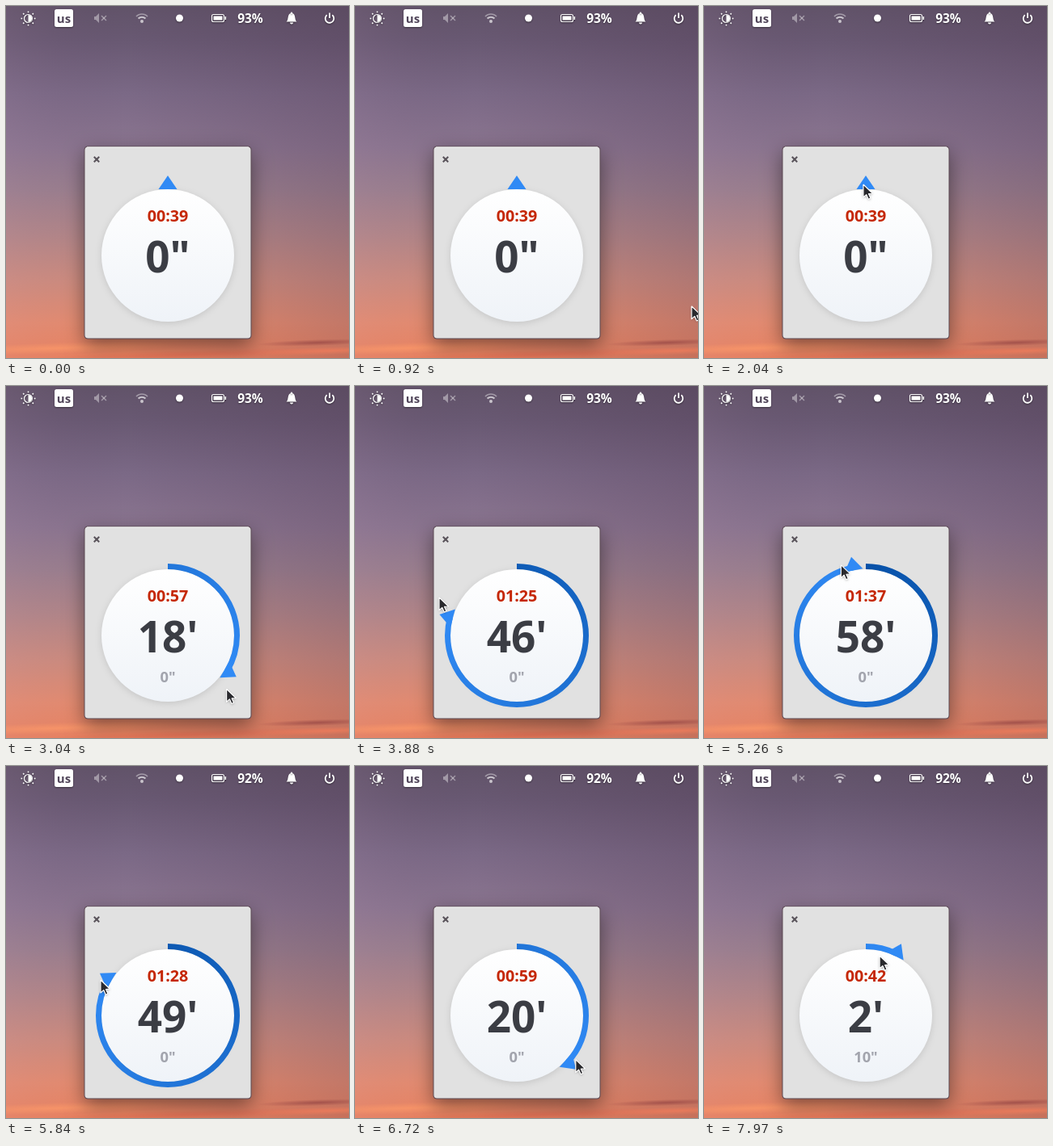
Recreate the animation shown at these times as an HTML page with a canvas. Size 424 by 436 pixels, loop 8 s.

```html
<!DOCTYPE html>
<html lang="en">
<head>
<meta charset="utf-8">
<title>Dial timer</title>
<style>
  html, body { margin: 0; width: 100%; height: 100%; overflow: hidden; }
  canvas { display: block; width: 424px; height: 436px; }
</style>
</head>
<body>
<canvas id="stage" width="424" height="436"></canvas>
<script>
const ctx = document.getElementById('stage').getContext('2d');
const W = 424, H = 436, LOOP = 8000;
const CX = 200, CY = 309, DISC = 82, RING = 7;
const BRIGHT = '#308af5', DARK = '#064fa5';
const RAD = Math.PI / 180;
const START_CLOCK = 39 * 60 + 51;

// Tracks of [time, value]
const headTrack = [[2200, 0], [2520, 18], [3340, 190], [3880, 285], [4170, 330],
  [4480, 390], [4630, 384.5], [5840, 302], [6720, 132.5], [7970, 26.3]];
const handTrack = [[2100, -2], [2520, 24], [3340, 203], [3880, 296], [4170, 342],
  [4460, 388], [4630, 376.7], [5840, 298], [6720, 127], [7970, 13]];
const reachTrack = [[2100, 88], [3880, 107], [4630, 91], [5840, 94], [6720, 91], [7970, 76]];

// Smooth interpolation that never overshoots a turning point
function sample(track, t) {
  const last = track.length - 1;
  if (t <= track[0][0]) return track[0][1];
  if (t >= track[last][0]) return track[last][1];
  const slope = i => (track[i + 1][1] - track[i][1]) / (track[i + 1][0] - track[i][0]);
  const tangent = i => {
    if (i === 0 || i === last) return 0;
    const a = slope(i - 1), b = slope(i);
    return a * b <= 0 ? 0 : 2 * a * b / (a + b);
  };
  const i = track.findIndex(key => key[0] > t) - 1;
  const [t0, v0] = track[i], [t1, v1] = track[i + 1];
  const d = t1 - t0, u = (t - t0) / d;
  return v0 + (v1 - v0) * u * u * (3 - 2 * u)
    + d * u * (1 - u) * ((1 - u) * tangent(i) - u * tangent(i + 1));
}

// The first tenth of the dial is stretched: three minutes in ten-second steps
function dialSeconds(angle) {
  const turns = angle / 360;
  if (turns <= 0.1) return Math.floor(turns * 180) * 10;
  return Math.floor((60 * turns - 3) / 57 * 60) * 60;
}

function polar(angle, radius) {
  return [CX + radius * Math.sin(angle * RAD), CY - radius * Math.cos(angle * RAD)];
}

function gradient(x0, y0, x1, y1, stops) {
  const g = ctx.createLinearGradient(x0, y0, x1, y1);
  stops.forEach(([at, color]) => g.addColorStop(at, color));
  return g;
}

function shadow(color, blur, y) {
  ctx.shadowColor = color;
  ctx.shadowBlur = blur;
  ctx.shadowOffsetY = y;
}
const noShadow = () => shadow('transparent', 0, 0);

function polygon(points, color) {
  ctx.beginPath();
  points.forEach(([x, y]) => ctx.lineTo(x, y));
  ctx.closePath();
  ctx.fillStyle = color;
  ctx.fill();
}

function line(points, width = 1.5) {
  ctx.beginPath();
  points.forEach(([x, y]) => ctx.lineTo(x, y));
  ctx.lineWidth = width;
  ctx.stroke();
}

function arc(x, y, r, from = 0, to = 360) {
  ctx.beginPath();
  ctx.arc(x, y, r, from * RAD, to * RAD);
}

function box(x, y, w, h, r, color) {
  ctx.beginPath();
  ctx.roundRect(x, y, w, h, r);
  ctx.fillStyle = color;
  ctx.fill();
}

function label(str, x, y, size, color) {
  ctx.font = `700 ${size}px "Open Sans", sans-serif`;
  ctx.textAlign = 'center';
  ctx.fillStyle = color;
  ctx.fillText(str, x, y);
}

function drawSky() {
  ctx.fillStyle = gradient(0, 0, 0, H, [[0, '#615369'], [0.1, '#695973'], [0.25, '#7b6986'],
    [0.4, '#8b7590'], [0.52, '#9b7f8f'], [0.65, '#b48789'], [0.78, '#d08d7f'],
    [0.9, '#e88d70'], [1, '#ee8460']]);
  ctx.fillRect(0, 0, W, H);
  ctx.fillStyle = gradient(0, 0, W, 0, [[0, 'rgba(170,135,165,.12)'],
    [0.35, 'rgba(75,50,75,0)'], [1, 'rgba(75,50,75,.24)']]);
  ctx.fillRect(0, 0, W, H);
  const streaks = [[60, 424, 150, 7, '255,155,105,.65'], [230, 432, 200, 6, '224,102,78,.55'],
    [385, 417, 75, 4, '146,66,66,.7'], [400, 427, 95, 5, '250,128,90,.6']];
  for (const [x, y, rx, ry, rgba] of streaks) {
    ctx.save();
    ctx.translate(x, y);
    ctx.rotate(-0.03);
    ctx.scale(rx, ry);
    const g = ctx.createRadialGradient(0, 0, 0, 0, 0, 1);
    g.addColorStop(0, `rgba(${rgba})`);
    g.addColorStop(1, `rgba(${rgba.replace(/[^,]+$/, '0')})`);
    ctx.fillStyle = g;
    ctx.fillRect(-1, -1, 2, 2);
    ctx.restore();
  }
}

function drawPanel(battery) {
  ctx.strokeStyle = ctx.fillStyle = '#fff';
  shadow('rgba(0,0,0,.45)', 2, 1);

  // Brightness
  arc(27.5, 15.5, 5);
  ctx.lineWidth = 1.2;
  ctx.stroke();
  arc(27.5, 15.5, 4.6, -90, 90);
  ctx.fill();
  for (let a = 0; a < 360; a += 45) {
    const x = Math.cos(a * RAD), y = Math.sin(a * RAD);
    line([[27.5 + 7.3 * x, 15.5 + 7.3 * y], [27.5 + 9 * x, 15.5 + 9 * y]], 1.6);
  }

  // Keyboard layout
  box(60, 4, 23, 22, 2.5, '#fff');
  noShadow();
  label('us', 71.5, 20.5, 15, '#51465a');

  // Muted speaker and wireless
  ctx.globalAlpha = 0.4;
  polygon([[109, 13], [111, 13], [115, 9], [115, 21], [111, 17], [109, 17]], '#fff');
  line([[118, 12], [124, 18]]);
  line([[124, 12], [118, 18]]);
  arc(168, 20, 10, -135, -45);
  ctx.stroke();
  ctx.globalAlpha = 0.65;
  arc(168, 20, 6.3, -135, -45);
  ctx.lineWidth = 2;
  ctx.stroke();
  arc(168, 19, 2);
  ctx.fill();
  ctx.globalAlpha = 1;

  shadow('rgba(0,0,0,.45)', 2, 1);
  arc(214.5, 15, 4.5);
  ctx.fill();

  // Battery
  ctx.beginPath();
  ctx.roundRect(254.5, 10.5, 15, 9, 2);
  ctx.lineWidth = 1.2;
  ctx.stroke();
  box(256.5, 12.5, 11, 5, 0.5, '#fff');
  box(270.5, 13, 1.6, 4, 0.5, '#fff');
  label(battery + '%', 302, 20.7, 15.5, '#fff');

  // Bell
  ctx.beginPath();
  ctx.moveTo(346.5, 19.5);
  ctx.bezierCurveTo(350, 17, 347, 9, 353, 8.7);
  ctx.bezierCurveTo(359, 9, 356, 17, 359.5, 19.5);
  ctx.fill();
  arc(353, 20.5, 2, 0, 180);
  ctx.fill();
  arc(353, 8.8, 1.2);
  ctx.fill();

  // Power
  arc(400, 15.5, 5.3, -52, 232);
  ctx.lineWidth = 1.8;
  ctx.stroke();
  line([[400, 8.5], [400, 15]], 1.8);
  noShadow();
}

function drawWindow() {
  shadow('rgba(0,0,0,.45)', 24, 8);
  box(96.5, 173.5, 207, 239, 4.5, '#5c4a55');
  noShadow();
  box(97.5, 174.5, 205, 237, 4, '#e1e1e1');
  ctx.strokeStyle = '#f1f1f1';
  line([[100, 175], [300, 175]], 1);
  ctx.strokeStyle = '#58525a';
  line([[108.8, 186.8], [115.2, 193.2]], 2);
  line([[115.2, 186.8], [108.8, 193.2]], 2);
}

function drawDial(angle, t) {
  shadow('rgba(0,0,0,.12)', 9, 2);
  arc(CX, CY, DISC);
  ctx.fillStyle = gradient(0, CY - DISC, 0, CY + DISC, [[0, '#fff'], [1, '#eff3f8']]);
  ctx.fill();
  noShadow();

  if (angle > 0) {
    const trail = ctx.createConicGradient((angle - 90) * RAD, CX, CY);
    trail.addColorStop(0, DARK);
    trail.addColorStop(1, BRIGHT);
    arc(CX, CY, DISC + RING / 2, -90, -90 + Math.min(angle, 360));
    ctx.strokeStyle = trail;
    ctx.lineWidth = RING;
    ctx.stroke();
  }
  const half = Math.atan(11.5 / DISC) / RAD, corner = Math.hypot(DISC, 11.5);
  polygon([polar(angle, 99), polar(angle + half, corner), polar(angle - half, corner)], BRIGHT);

  const total = dialSeconds(angle), minutes = Math.floor(total / 60), seconds = total % 60;
  const end = Math.floor((START_CLOCK + t / 1000 + total) / 60);
  const pad = n => String(n).padStart(2, '0');
  label(`${pad(Math.floor(end / 60))}:${pad(end % 60)}`, CX, 267, 19.7, '#c52704');
  label(minutes ? `${minutes}'` : `${seconds}"`, CX, 330, 53, '#3b3d44');
  if (minutes) label(`${seconds}"`, CX, 366.5, 18.3, '#a2a4ad');
}

function drawCursor(t) {
  if (t < 900) return;
  let [x, y] = polar(sample(handTrack, t), sample(reachTrack, t));
  if (t < 1700) {
    const away = (1 - (t - 900) / 800) ** 2;
    x += (W + 4 - x) * away;
    y += (380 - y) * away;
  }
  ctx.save();
  ctx.translate(x, y);
  const arrow = [[0, 0], [0, 16], [3.8, 12.6], [6.3, 18.2], [9, 17], [6.6, 11.6], [11.6, 11.2]];
  shadow('rgba(0,0,0,.4)', 3, 1);
  polygon(arrow, '#29292d');
  noShadow();
  ctx.strokeStyle = '#fff';
  ctx.lineJoin = 'round';
  line([...arrow, arrow[0]], 1.2);
  ctx.restore();
}

function render(now) {
  const t = now % LOOP;
  drawSky();
  drawPanel(t < 5450 ? 93 : 92);
  drawWindow();
  drawDial(sample(headTrack, t), t);
  drawCursor(t);
}

const began = performance.now();
function tick() {
  render(performance.now() - began);
  requestAnimationFrame(tick);
}
tick();
</script>
</body>
</html>
```
